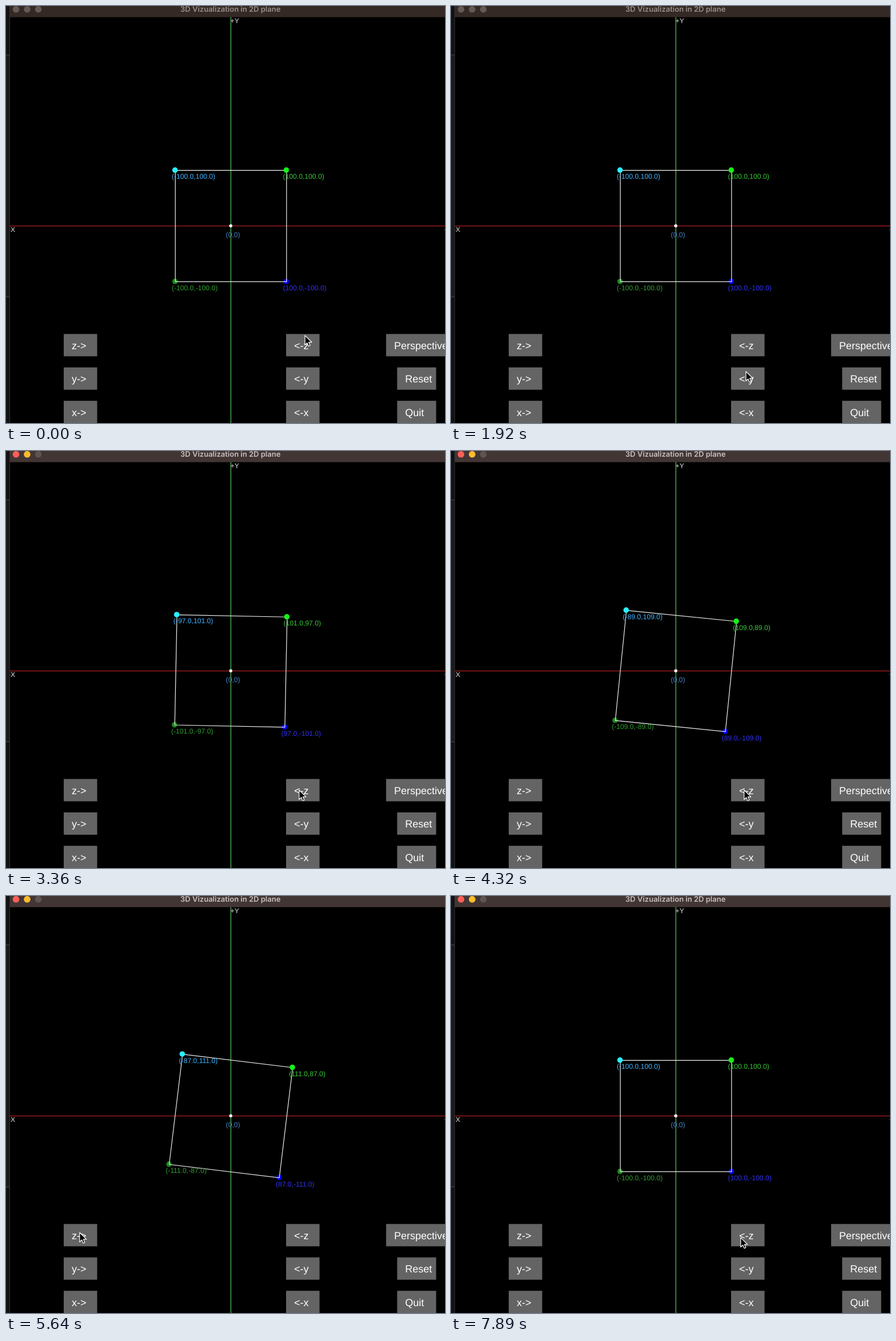
An HTML page for the animation above (8000 ms loop, 768 by 729 pixels).

```html
<!DOCTYPE html>
<html lang="en">
<head>
<meta charset="utf-8">
<title>3D Vizualization in 2D plane</title>
<style>
  html, body { margin: 0; width: 100%; height: 100%; overflow: hidden; background: #000; }
  svg { display: block; width: 768px; height: 729px; }
  text { font: 12.15px "Liberation Sans", Arial, sans-serif; white-space: pre; text-rendering: geometricPrecision; }
  #buttons text { font-size: 18px; fill: #fff; }
  #buttons rect { fill: #646464; }
  #title { font: 600 13px Inter, "Open Sans", sans-serif; }
</style>
</head>
<body>
<svg viewBox="0 0 768 729">
  <rect width="768" height="729"/>
  <g fill="#ddd">
    <path d="M7 384.5H768" stroke="#981a1a" stroke-width="1.6"/>
    <path d="M393.4 19V729" stroke="#4fae4f" stroke-width="1.4"/>
    <text x="392.6" y="30">+Y</text>
    <text x="3.9" y="394.5">-X</text>
    <text x="766.5" y="394.5">+X</text>
  </g>
  <g id="shape"></g>
  <circle cx="393.2" cy="384.3" r="2.7" fill="#fff"/>
  <text x="384.6" y="404.3" fill="#4686c8">(0,0)</text>
  <g id="buttons"></g>
  <rect width="6" height="729" fill="#121212"/>
  <rect y="85" width="6" height="423" fill="#1a1a1a"/>
  <path d="M0 85.5H6M0 508.5H6" stroke="#4a4a4a"/>
  <path d="M6.5 0V729" stroke="#303030"/>
  <rect id="bar" x="7" width="761" height="19.5"/>
  <g id="lights"></g>
  <text id="title" x="392.7" y="10" text-anchor="middle">3D Vizualization in 2D plane</text>
  <path id="cursor" d="M0 0V16.5L3.8 12.9L6.3 18.7L9 17.5L6.6 11.8H11.9Z" stroke="#fff" stroke-width="1.2" stroke-linejoin="round"/>
</svg>
<script>
const LOOP = 8000, TICK = 30, STEP = 0.02;
const CENTER = [393.2, 384.4], SCALE = 0.973;
const FOCUS_AT = 2820;

const burst = (start, count, gap) => Array.from({ length: count }, (_, i) => start + i * gap);

// Each click turns the square by one step.
const CLICKS_CW = [...burst(3270, 1, 0), ...burst(3680, 5, 210)];
const CLICKS_CCW = [...burst(5670, 3, 150), ...burst(6270, 3, 150)];

// Pointer moves between rests: start, end, x, y, sag of the path
const HOME = [523, 576];
const MOVES = [
  [0, 430, 625, 620, 0],
  [430, 820, 520, 650, 0],
  [900, 1300, 511, 707, 0],
  [1650, 1900, 516, 639, 0],
  [1980, 2450, 512.8, 592.8, 0],
  [4800, 5130, 128.8, 588.3, 0],
  [7200, 7890, 506.8, 597.3, 22]
];

// x sign, y sign, dot colour, label colour
const CORNERS = [
  [-1, 1, '#28f0ff', '#40b4ff'],
  [1, 1, '#18f018', '#38c838'],
  [1, -1, '#0000f0', '#3030f0'],
  [-1, -1, '#1a841a', '#2f9e2f']
];

const $ = id => document.getElementById(id);

function set(el, attrs) {
  for (const k in attrs) el.setAttribute(k, attrs[k]);
  return el;
}

function add(parent, tag, attrs, text = '') {
  const el = set(document.createElementNS('http://www.w3.org/2000/svg', tag), attrs);
  el.textContent = text;
  return parent.appendChild(el);
}

function button(label, x, row, width) {
  const y = 573.4 + row * 58.4;
  add($('buttons'), 'rect', { x, y, width, height: 39 });
  add($('buttons'), 'text', { x: x + 14, y: y + 26.4 }, label);
}

['z', 'y', 'x'].forEach((axis, row) => {
  button(axis + '->', 101, row, 58.5);
  button('<-' + axis, 490, row, 58.5);
});
button('Perspective', 665, 0, 120);
button('Reset', 684.3, 1, 68.2);
button('Quit', 684.3, 2, 68.2);

const lights = [0, 1, 2].map(i => add($('lights'), 'circle', { cx: 17.5 + i * 19.5, cy: 5.8, r: 5.8 }));

const shape = $('shape');
const dot = c => add(shape, 'circle', { r: 4.8, fill: c[2] });
const lowDots = CORNERS.slice(2).map(dot);
const outline = add(shape, 'polygon', { fill: 'none', stroke: '#f0f0f0', 'stroke-width': 1.2 });
const dots = [...CORNERS.slice(0, 2).map(dot), ...lowDots];
const labels = CORNERS.map(c => add(shape, 'text', { fill: c[3] }));

function pointer(t) {
  let [x, y] = HOME;
  for (const [start, end, toX, toY, sag] of MOVES) {
    if (t <= start) break;
    const k = Math.min(1, (t - start) / (end - start));
    const ease = k * k * (3 - 2 * k);
    x += (toX - x) * ease;
    y += (toY - y) * ease + sag * Math.sin(Math.PI * k);
  }
  return [x, y];
}

function drawShape(t) {
  const count = list => list.filter(c => c <= t).length;
  const angle = (count(CLICKS_CW) - count(CLICKS_CCW)) * STEP;
  const c = Math.cos(angle), s = Math.sin(angle);
  const points = CORNERS.map(([ux, uy], i) => {
    // corners snap to whole units, as their labels show
    const x = Math.trunc(100 * (ux * c + uy * s));
    const y = Math.trunc(100 * (uy * c - ux * s));
    const px = CENTER[0] + x * SCALE, py = CENTER[1] - y * SCALE;
    set(dots[i], { cx: px - 0.2, cy: py - 0.2 });
    set(labels[i], { x: px - 6, y: py + 15.2 });
    labels[i].textContent = `(${x.toFixed(1)},${y.toFixed(1)})`;
    return `${px + 0.3},${py + 0.2}`;
  });
  set(outline, { points: points.join(' ') });
}

function drawWindow(t) {
  const on = t >= FOCUS_AT;
  const colors = on ? ['#ff5f57', '#febc2e', '#5f5452'] : Array(3).fill('#645956');
  lights.forEach((l, i) => set(l, { fill: colors[i] }));
  set($('bar'), { fill: on ? '#423635' : '#352925' });
  set($('title'), { fill: on ? '#c8c0be' : '#988e8a' });
}

function draw(time) {
  const t = Math.floor((time % LOOP) / TICK) * TICK;
  drawShape(t);
  drawWindow(t);
  set($('cursor'), { transform: `translate(${pointer(t)})` });
}

const start = performance.now();
function loop() {
  draw(performance.now() - start);
  requestAnimationFrame(loop);
}
loop();
</script>
</body>
</html>
```
